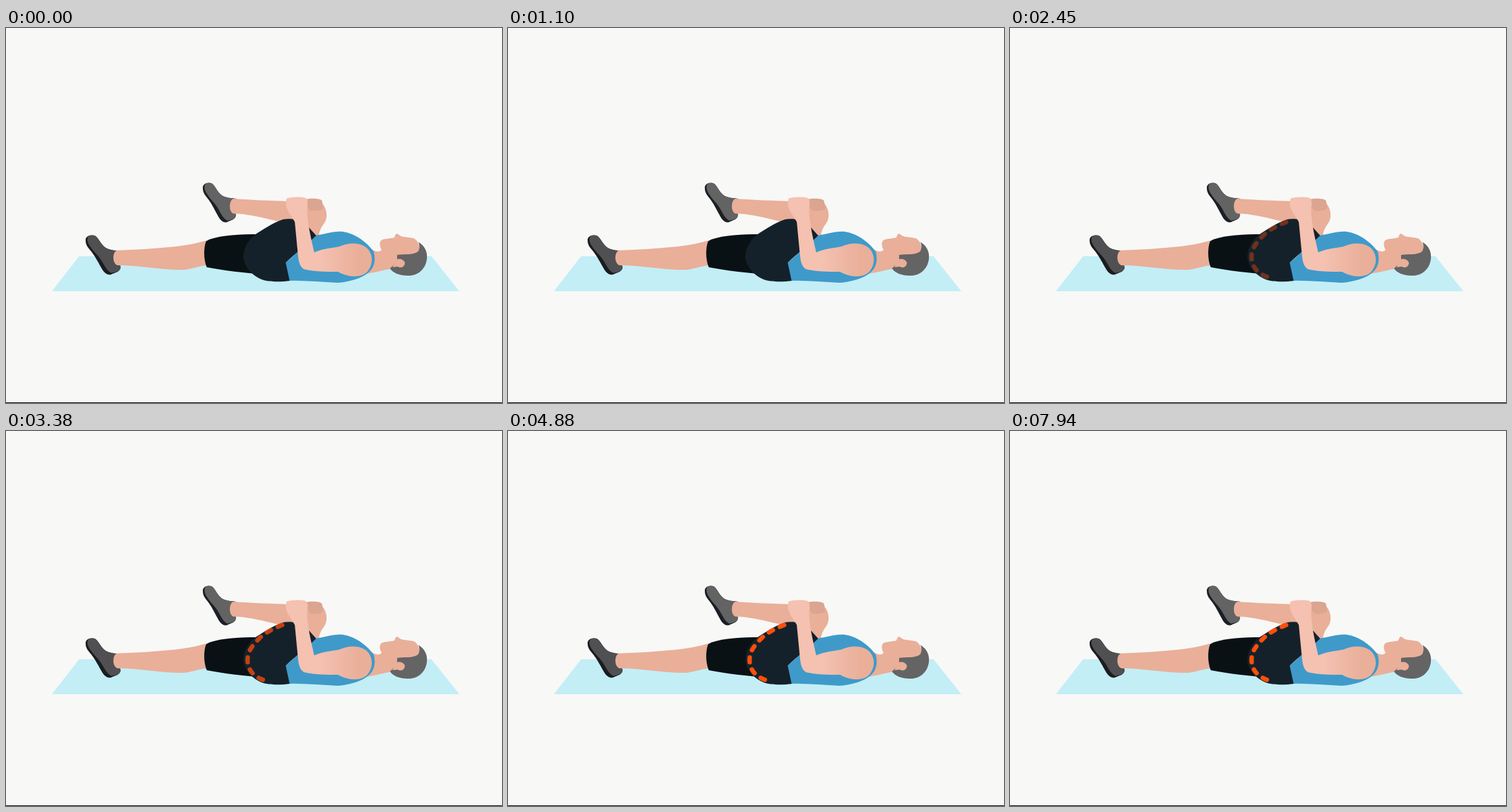
These frames come from a looping animation (766 by 580 pixels, 8 s). An HTML page with a canvas:

```html
<!DOCTYPE html>
<html lang="en">
<head>
<meta charset="utf-8">
<title>Knee to chest stretch</title>
<style>
html, body { margin: 0; width: 100%; height: 100%; overflow: hidden; background: #f8f8f7; }
canvas { display: block; }
</style>
</head>
<body>
<canvas id="stage" width="766" height="580"></canvas>
<script>
const ctx = document.getElementById('stage').getContext('2d');
const LOOP = 8000;
const FADE_START = 1400;
const FADE_END = 4100;

const SKIN = '#e9af99';
const PINK = '#f5c1b1';

const shape = {
  mat: 'M113 353H657L700 407H71Z',
  sole: 'M123 329C122 322 130 319 137 321C143 324 146 335 154 340C160 344 171 344 177 345C177 352 174 363 177 370C176 378 168 378 163 381C158 383 153 380 149 374C143 364 139 355 132 346C127 340 123 336 123 329Z',
  upper: 'M126 325C127 320 133 320 137 321C143 324 146 335 154 340C160 344 171 344 177 345C177 352 174 363 177 370C176 378 168 377 163 379C156 376 152 367 147 359C141 350 135 346 130 338C127 334 125 329 126 325Z',
  farLeg: 'M171 344C200 343 230 341 250 339C275 337 295 333 312 328V367C297 368 290 372 275 374C245 375 205 367 172 367C164 364 164 347 171 344Z',
  farShorts: 'M314 327C335 320 360 319 390 319L400 381C370 379 335 375 310 370C305 358 305 340 309 330Z',
  shin: 'M351 264C380 266 410 267 435 268L470 265C480 263 488 266 489 272C496 280 498 295 490 304C486 309 484 315 483 321H470L445 300C430 302 410 297 395 293C380 290 365 287 351 287C344 284 344 267 351 264Z',
  farHand: 'M463 265C470 263 485 263 488 267L490 279C485 284 478 282 472 283C466 280 464 272 463 265Z',
  thigh: 'M428 296C440 294 455 297 462 302L479 321C465 335 445 350 432 363L438 391C425 393 405 393 395 389C382 384 370 372 367 358C365 342 375 325 390 316C403 308 415 300 428 296Z',
  head: 'M562 340C570 347 577 347 580 343C577 338 576 331 580 328C586 325 595 326 600 324C601 318 604 317 607 320C611 324 620 323 629 325C636 328 640 336 638 347L615 372H598C588 373 575 377 558 380Z',
  hair: 'M637 331C648 338 651 347 650 357C648 374 635 384 620 383C608 383 598 379 593 372L599 366L604 358V351C615 349 630 352 637 345C639 340 639 336 637 331Z',
  ear: 'M601 359C606 356 614 357 616 363C616 370 609 372 605 369L597 370Z',
  shirt: 'M431 364C445 352 462 335 478 321C492 319 505 314 520 315C540 318 557 331 568 346C572 362 567 372 560 378C550 387 530 393 512 394C485 393 460 390 437 391C432 384 430 374 431 364Z',
  arm: 'M433 264C440 261 456 261 463 263C467 267 466 273 465 279C465 300 471 325 476 347C490 341 505 340 515 338C530 331 550 331 560 343C567 353 567 366 558 377C548 387 528 386 513 377C495 377 475 377 460 373C454 369 452 362 451 352L446 300C441 291 433 282 432 272Z',
  stretch: 'M429 299C412 306 401 311 391 321C379 333 373 342 373 355C374 371 383 380 400 386'
};
const paths = {};
for (const name in shape) paths[name] = new Path2D(shape[name]);

const armFill = ctx.createLinearGradient(485, 0, 545, 0);
armFill.addColorStop(0, PINK);
armFill.addColorStop(1, SKIN);

function fill(name, color) {
  ctx.fillStyle = color;
  ctx.fill(paths[name]);
}

function shoe(dx, dy, scale, color, soleColor) {
  ctx.save();
  ctx.translate(123 + dx, 320 + dy);
  ctx.scale(scale, 1);
  ctx.translate(-123, -320);
  fill('sole', soleColor);
  fill('upper', color);
  ctx.restore();
}

function drawStretch(alpha) {
  ctx.save();
  ctx.globalAlpha = alpha;
  ctx.strokeStyle = '#ff4e0a';
  ctx.lineWidth = 6.8;
  ctx.lineCap = 'round';
  ctx.setLineDash([7.2, 11.9]);
  ctx.lineDashOffset = -2.6;
  ctx.stroke(paths.stretch);
  ctx.restore();
}

function draw(t) {
  ctx.fillStyle = '#f8f8f7';
  ctx.fillRect(0, 0, 766, 580);
  ctx.fillStyle = '#000';
  ctx.fillRect(0, 579, 766, 1);

  fill('mat', '#c3eef6');
  shoe(0, 0, 1, '#505052', '#1b1c20');
  fill('farLeg', SKIN);
  fill('farShorts', '#0a1114');
  shoe(181, -81, 0.95, '#636364', '#1b2026');
  fill('shin', SKIN);
  fill('farHand', '#dba590');
  fill('head', SKIN);
  fill('hair', '#646465');
  fill('ear', SKIN);
  fill('shirt', '#3f9aca');
  fill('thigh', '#15212a');

  const k = (t - FADE_START) / (FADE_END - FADE_START);
  drawStretch(Math.min(1, Math.max(0, k)));
  fill('arm', armFill);
}

const start = performance.now();
function tick() {
  draw((performance.now() - start) % LOOP);
  requestAnimationFrame(tick);
}
tick();
</script>
</body>
</html>
```
